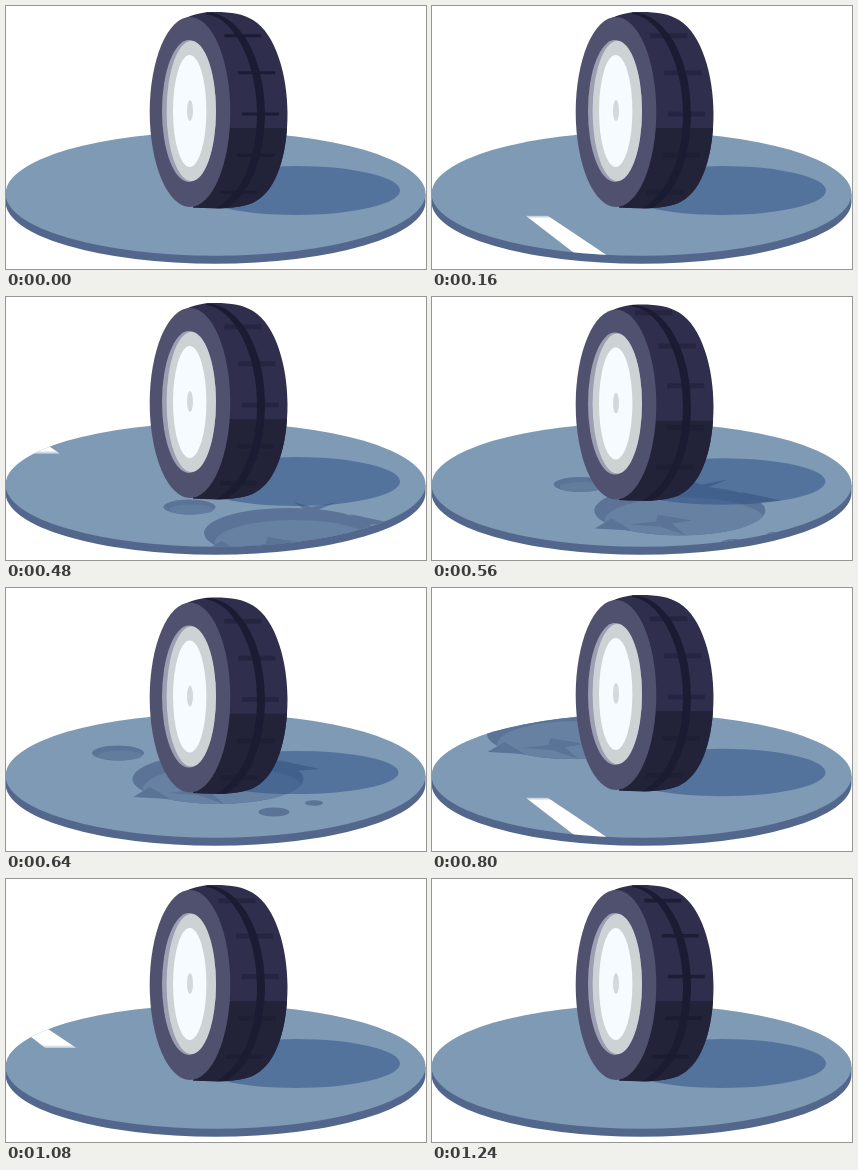
Animation, 420 px wide and 263 px high, one loop 1.28 s. Source, as an HTML page:

```html
<!DOCTYPE html>
<html lang="en">
<head>
<meta charset="utf-8">
<title>Rolling tyre</title>
<style>
  html, body { margin: 0; width: 100%; height: 100%; overflow: hidden; background: #fff; }
  svg { display: block; width: 100%; height: 100%; }
</style>
</head>
<body>
<svg viewBox="0 0 420 263">
  <defs>
    <clipPath id="road"><ellipse cx="209.5" cy="187.7" rx="210" ry="62"/></clipPath>
    <clipPath id="pit"><ellipse rx="85.5" ry="25"/></clipPath>
    <clipPath id="tread">
      <path id="treadShape" d="M180 12C190 7 200 6 209 6C226 6 237 8 247 14C270 28 281.5 70 281.5 107C281.5 150 270 184 250 195C238 203 210 203 187 201.5Z"/>
    </clipPath>
    <linearGradient id="paint" x2="0" y2="1">
      <stop offset="0" stop-color="#fff" stop-opacity=".4"/>
      <stop offset=".06" stop-color="#fff"/>
      <stop offset=".93" stop-color="#fff"/>
      <stop offset="1" stop-color="#fff" stop-opacity=".4"/>
    </linearGradient>
  </defs>

  <path d="M-.5 187.7v8a210 62 0 0 0 420 0v-8z" fill="#53678c"/>
  <ellipse cx="209.5" cy="187.7" rx="210" ry="62" fill="#7f9ab5"/>

  <g clip-path="url(#road)">
    <polygon id="dash" points="29,160.5 51,160.5 119,206 88,206" fill="url(#paint)"/>
    <g id="holes" fill="#5a7396">
      <ellipse rx="85.5" ry="25"/>
      <ellipse cx="5" cy="10" rx="80" ry="23" fill="#6681a2" clip-path="url(#pit)"/>
      <path d="M-22 4L12 10L-8 13L6 25L-20 16L-50 14L-24 11Z"/>
      <path d="M-85 18L-68 8L-48 20Z"/>
      <path d="M60 -19L102 -10L78 -8Z"/>
      <path d="M4 -31L22 -26L48 -31L28 -23L16 -23Z"/>
      <ellipse cx="-100" cy="-26" rx="26" ry="7.5"/>
      <ellipse cx="-98" cy="-23.5" rx="22" ry="5" fill="#627c9e"/>
      <ellipse cx="56" cy="33" rx="15.5" ry="4.5"/>
      <ellipse cx="96" cy="24" rx="9" ry="2.7"/>
    </g>
  </g>
  <ellipse id="shadow" cx="290" cy="184.5" fill="#2b4e83" fill-opacity=".5"/>

  <g id="tyre">
    <use href="#treadShape" fill="#2f2f4d"/>
    <g clip-path="url(#tread)">
      <rect x="180" y="122" width="110" height="90" fill="#222338"/>
      <g id="bars" stroke="#1b1c33"></g>
      <path d="M200 6C236 8 259 55 259 107C259 150 245 190 217 204H207C238 188 251 150 251 107C251 60 230 12 200 8Z" fill="#1b1c33"/>
    </g>
    <ellipse cx="184" cy="106" rx="40.3" ry="95" fill="#50506f"/>
    <ellipse cx="183" cy="105" rx="27" ry="71" fill="#9d9eb2"/>
    <ellipse cx="185.3" cy="105" rx="24.7" ry="70" fill="#cdd3d5"/>
    <ellipse cx="183.7" cy="105" rx="16.7" ry="56" fill="#f5fbfe"/>
    <ellipse cx="184" cy="104.5" rx="3" ry="10.5" fill="#d3d9db"/>
  </g>
</svg>

<script>
const LOOP = 1280, STEP = 40, DASH_LOOP = 640, BAR_LOOP = 160;
const SPACING = 18.5 * Math.PI / 180;
const $ = id => document.getElementById(id);

const dip = [[0, 0], [480, 0], [560, 1.6], [640, 3.6], [720, 2.6], [800, 1], [880, 0], [LOOP, 0]];
const contrast = [[0, 1], [160, .45], [1080, .45], [1240, .85], [LOOP, 1]];

function track(keys, t) {
  const i = keys.findIndex(k => k[0] > t);
  const [t0, a] = keys[i - 1], [t1, b] = keys[i];
  return a + (b - a) * (t - t0) / (t1 - t0);
}

function set(el, attrs) {
  for (const k in attrs) el.setAttribute(k, attrs[k]);
}

const move = (id, x, y) => set($(id), { transform: `translate(${x} ${y})` });

const bars = Array.from({ length: 7 }, () =>
  $('bars').appendChild(document.createElementNS('http://www.w3.org/2000/svg', 'line')));

function draw(t) {
  const dashTime = t % DASH_LOOP - 320, holeTime = t - 640;
  move('dash', -.405 * dashTime, -.3075 * dashTime);
  move('holes', 212 - .447 * holeTime, 191 - .281 * holeTime);

  const drop = track(dip, t);
  move('tyre', 0, drop);
  set($('shadow'), { rx: 104 - .4 * drop, ry: 24.5 - .8 * drop });

  // Tread bars ride down the curved front and turn soft while spinning.
  const turn = t % BAR_LOOP / BAR_LOOP;
  bars.forEach((bar, i) => {
    const y = 108 + 130 * Math.sin((i - 3 + turn) * SPACING);
    const x = 210.5 + 44 * Math.sqrt(Math.max(0, 1 - ((y - 105) / 94) ** 2));
    set(bar, { x1: x - 18.5, x2: x + 18.5, y1: y, y2: y });
    bar.style.display = Math.abs(y - 105) < 92 ? '' : 'none';
  });
  const ink = track(contrast, t);
  set($('bars'), { opacity: ink, 'stroke-width': 6.5 - 3.3 * ink });
}

const start = performance.now();
function tick() {
  const t = (performance.now() - start) % LOOP;
  draw(Math.floor(t / STEP) * STEP);
  requestAnimationFrame(tick);
}
tick();
</script>
</body>
</html>
```
